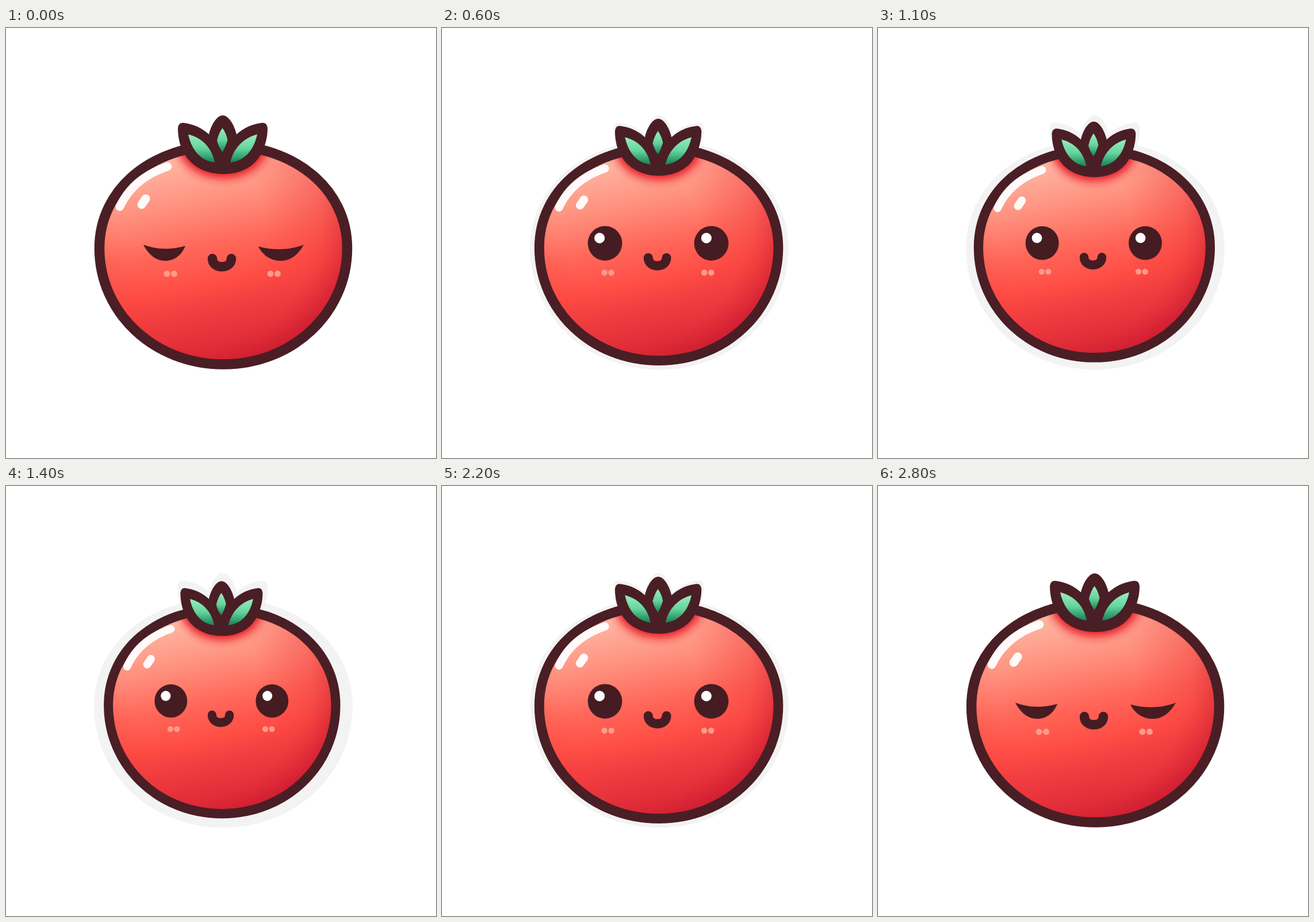
These frames come from a looping animation (748x748 px, 2900 ms). An HTML page:

```html
<!DOCTYPE html>
<html lang="en">
<head>
<meta charset="utf-8">
<title>Sleepy fruit</title>
<style>
  html, body { margin: 0; width: 100%; height: 100%; overflow: hidden; background: #fff; }
  svg { display: block; width: 100vw; height: 100vh; }
</style>
</head>
<body>
<svg viewBox="0 0 748 748">
  <defs>
    <linearGradient id="skin" gradientUnits="userSpaceOnUse" x1="340" y1="215" x2="410" y2="580">
      <stop offset="0" stop-color="#ffb8a5"/>
      <stop offset=".22" stop-color="#ff9381"/>
      <stop offset=".44" stop-color="#ff6759"/>
      <stop offset=".62" stop-color="#ff4d45"/>
      <stop offset=".82" stop-color="#e6323d"/>
      <stop offset="1" stop-color="#c8172e"/>
    </linearGradient>
    <radialGradient id="shade" gradientUnits="userSpaceOnUse" cx="320" cy="330" r="300">
      <stop offset=".42" stop-color="#f8443e" stop-opacity="0"/>
      <stop offset=".75" stop-color="#f03a3c" stop-opacity=".38"/>
      <stop offset="1" stop-color="#c0102c" stop-opacity=".75"/>
    </radialGradient>
    <linearGradient id="leaf" x1="0" y1="0" x2="0" y2="1">
      <stop offset="0" stop-color="#98ecc2"/>
      <stop offset=".5" stop-color="#66d49c"/>
      <stop offset="1" stop-color="#128055"/>
    </linearGradient>
    <filter id="soft" x="-30%" y="-30%" width="160%" height="160%">
      <feGaussianBlur stdDeviation="8"/>
    </filter>
    <path id="body" d="M162.5 383C162.5 280 254 204 378 204C502 204 593.5 280 593.5 383
      C593.5 496 498 585 378 585C258 585 162.5 496 162.5 383Z"/>
    <path id="crown" d="M299 174Q300 164 309 165Q334 168 353 185C357 168 367 152 377 152
      C387 152 397 168 401 185Q420 168 445 165Q454 164 455 174C455 192 450 208 442 222
      C429 244 405 254 378 254C350 254 326 243 312 222C303 208 299 191 299 174Z"/>
    <clipPath id="inside"><use href="#body"/></clipPath>
  </defs>

  <g fill="#f3f3f3" stroke="#f3f3f3">
    <use href="#body" stroke-width="18.5"/>
    <use href="#crown" stroke-width="1"/>
  </g>

  <g id="fruit">
    <use href="#body" fill="url(#skin)"/>
    <use href="#body" fill="url(#shade)"/>
    <g clip-path="url(#inside)">
      <use href="#crown" fill="#e81f25" stroke="#e81f25" stroke-width="16" filter="url(#soft)"/>
    </g>
    <use href="#body" fill="none" stroke="#4a1e25" stroke-width="17.5"/>
    <use href="#crown" fill="#4a1e25"/>

    <g fill="url(#leaf)">
      <path d="M317 185C341 191 358 208 363 234C339 231 323 213 317 185Z"/>
      <path d="M376.5 174Q383 183 385.5 195Q382 207 376.5 216Q370 207 367 196Q370 183 376.5 174Z"/>
      <path d="M437 185C414 191 396 208 390 234C415 231 431 213 437 185Z"/>
    </g>

    <g fill="none" stroke="#fff" stroke-linecap="round" opacity=".95">
      <path d="M198 311Q221 261 281 241" stroke-width="14.5"/>
      <path d="M236 307L243 297" stroke-width="15"/>
    </g>

    <g fill="#ff9c8d">
      <circle cx="280" cy="427.5" r="5.4"/>
      <circle cx="292.5" cy="427.5" r="5.4"/>
      <circle cx="460" cy="427.5" r="5.4"/>
      <circle cx="472.5" cy="427.5" r="5.4"/>
    </g>
    <path d="M359 401C359 420 392 420 392 401" fill="none" stroke="#451c22" stroke-width="16.5" stroke-linecap="round"/>

    <g id="closed" fill="#451c22">
      <path d="M239 377Q274 390 312 379C305 397 291 405 277 405C260 405 247 393 239 377Z"/>
      <path d="M518 377Q480 391 439 380C447 397 463 405 478 405C496 405 509 393 518 377Z"/>
    </g>
    <g id="open" fill="#451c22">
      <circle cx="281" cy="375" r="31"/>
      <circle cx="472.8" cy="375" r="31"/>
      <g fill="#fff">
        <circle cx="271.2" cy="365.6" r="9.4"/>
        <circle cx="463.9" cy="365.6" r="9.4"/>
      </g>
    </g>
  </g>
</svg>
<script>
  const STEP = 100, LAST = 28, BLINK = 3;
  const PIVOT_X = 352, PIVOT_Y = 358;
  const [fruit, closed, open] = ['fruit', 'closed', 'open'].map(id => document.getElementById(id));
  const show = (el, on) => el.setAttribute('visibility', on ? 'visible' : 'hidden');

  function draw(now) {
    const step = Math.floor(now / STEP) % (LAST + 1);
    const depth = Math.min(step, LAST - step);
    const sx = 1 - 0.0059 * depth, sy = 1 - 0.0047 * depth;
    fruit.setAttribute('transform',
      `translate(${PIVOT_X} ${PIVOT_Y}) scale(${sx} ${sy}) translate(${-PIVOT_X} ${-PIVOT_Y})`);
    show(closed, depth < BLINK);
    show(open, depth >= BLINK);
  }

  const start = performance.now();
  function tick() {
    draw(performance.now() - start);
    requestAnimationFrame(tick);
  }
  tick();
</script>
</body>
</html>
```
